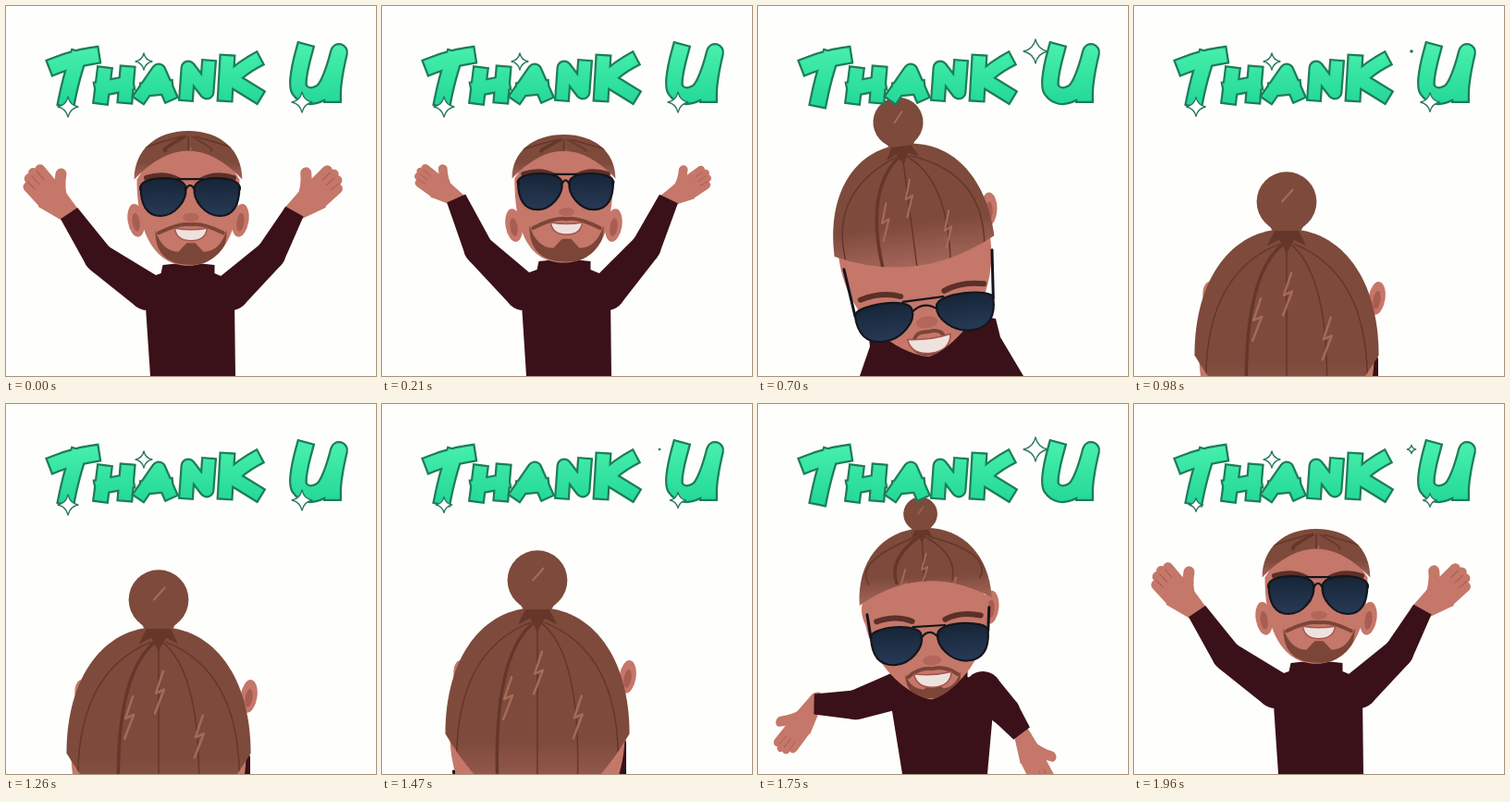
Write an HTML page with a canvas that moves like this. It is 400 by 400 pixels and loops after 2.03 s.

```html
<!DOCTYPE html>
<html lang="en">
<head>
<meta charset="utf-8">
<title>Thank U</title>
<style>
html, body { margin: 0; width: 100%; height: 100%; overflow: hidden; background: #fefefd; }
canvas { display: block; }
</style>
</head>
<body>
<canvas id="stage" width="400" height="400" role="img" aria-label="Thank U"></canvas>
<script>
const ctx = document.getElementById('stage').getContext('2d');
const LOOP = 2030, STEP = 70, TAU = Math.PI * 2;
const SKIN = '#c57769', SHADE = '#a95d52', HAIR = '#7d4a3b', DARK = '#653629',
      LIGHT = '#a56a58', CLOTH = '#3a1118', BEARD = '#7b4537', INK = '#14161c';

// x, y: point between the eyes; rise: height of the crown above it, which grows with the bow.
// neck, left, right, hipL, hipR: outline of the sweater.
const up = { x: 197, y: 206, rise: 71, tilt: 0, neck: 280, left: 148, right: 247, hipL: 156, hipR: 248 };
const back = { ...up, x: 196, y: 194, rise: 51, neck: 272 };
const nod = { ...up, x: 184, y: 259, rise: 125, tilt: -.06, neck: 286, left: 142, right: 255 };
const bow = { x: 179, y: 336, rise: 188, tilt: -.13, neck: 322, left: 118, right: 262, hipL: 110, hipR: 287 };
const low = { x: 165, y: 480, rise: 239, tilt: 0, neck: 346, left: 98, right: 264, hipL: 95, hipR: 264 };
const lift = { ...low, x: 168, y: 459, neck: 330 };
const figure = [[0, up], [420, back], [600, nod], [700, bow], [980, low], [1260, low],
  [1470, lift], [1645, bow], [1750, nod], [1960, up], [LOOP, up]];

// Each arm: angles of upper arm, forearm and hand in degrees, then reach.
const raised = { size: 1, breadth: 1, l: [215, 236, 222, 1], r: [-43, -61, -37, .92] };
const cupped = { size: .65, breadth: .55, l: [232, 256, 200, 1.08], r: [-54, -69, -20, 1.08] };
const spread = { size: .95, breadth: .9, l: [178, 188, 162, .7], r: [4, -4, 15, .63] };
const droop = { size: 1, breadth: .8, l: [161, 181, 122, .78], r: [44, 53, 68, .52] };
const hidden = { ...spread, l: [178, 188, 162, 0], r: [4, -4, 15, 0] };
const arms = [[0, raised], [420, cupped], [525, raised], [630, spread], [700, hidden], [1680, hidden],
  [1750, droop], [1820, spread], [1960, raised], [LOOP, raised]];

// Sparkles: x, y, largest radius, moment of the peak, share of time alight.
const sparkles = [[67, 109, 11, 200, .8], [320, 104, 11, 200, .8], [149, 60, 9, 90, .8], [300, 49, 13, 720, .15]];

const letters = [
  ['M55 64Q73 57 92 54M77 58Q70 80 66 100', 20],
  ['M106 74L103 98M131 73L129 97M104 89L130 84', 18],
  ['M147 96L165 70L176 95M153 90L173 88', 17],
  ['M195 95L197 67L217 93L219 66', 17],
  ['M239 61L237 95M268 60Q255 67 243 79L269 95', 18],
  ['M322 50Q313 83 317 90Q325 102 340 94Q350 89 360 50Q353 80 353 95', 20]
].map(([d, width]) => [new Path2D(d), width]);

const clamp = (v, a, b) => Math.max(a, Math.min(b, v));

function mix(a, b, k) {
  if (typeof a === 'number') return a + (b - a) * k;
  if (Array.isArray(a)) return a.map((v, i) => mix(v, b[i], k));
  return Object.fromEntries(Object.keys(a).map(n => [n, mix(a[n], b[n], k)]));
}
function at(track, t) {
  const i = track.findIndex(([end]) => end > t);
  const [[t0, a], [t1, b]] = [track[i - 1], track[i]];
  return mix(a, b, (t - t0) / (t1 - t0));
}

function fill(path, color) {
  ctx.fillStyle = color;
  ctx.fill(typeof path === 'string' ? new Path2D(path) : path);
}
function stroke(path, color, width, cap = 'round') {
  ctx.strokeStyle = color;
  ctx.lineWidth = width;
  ctx.lineCap = cap;
  ctx.lineJoin = 'round';
  ctx.stroke(typeof path === 'string' ? new Path2D(path) : path);
}
function oval(x, y, rx, ry, color, turn = 0) {
  ctx.beginPath();
  ctx.ellipse(x, y, rx, ry, turn, 0, TAU);
  ctx.fillStyle = color;
  ctx.fill();
}
function taper(x1, y1, r1, x2, y2, r2, color) {
  const a = Math.atan2(y2 - y1, x2 - x1) + Math.PI / 2, c = Math.cos(a), s = Math.sin(a);
  oval(x1, y1, r1, r1, color);
  fill(`M${x1 + c * r1} ${y1 + s * r1}L${x2 + c * r2} ${y2 + s * r2}L${x2 - c * r2} ${y2 - s * r2}L${x1 - c * r1} ${y1 - s * r1}Z`, color);
}
function blend(y0, y1, from, to, hold = 0) {
  const g = ctx.createLinearGradient(0, y0, 0, y1);
  g.addColorStop(hold, from);
  g.addColorStop(1, to);
  return g;
}

function drawArm(x, y, [upper, fore, hand, reach], size, breadth, side) {
  if (reach < .05) return;
  const rad = Math.PI / 180, u = 64 * reach, f = 58 * reach;
  const ex = x + u * Math.cos(upper * rad), ey = y + u * Math.sin(upper * rad);
  const wx = ex + f * Math.cos(fore * rad), wy = ey + f * Math.sin(fore * rad);
  ctx.save();
  ctx.translate(wx, wy);
  ctx.rotate(hand * rad);
  ctx.scale(size, breadth * side);
  taper(-4, 0, 10, 30, 0, 17, SKIN);
  for (let i = -1.5; i < 2; i++) stroke(`M28 ${i * 7}L${58 - i * i * 2 + i} ${i * 7.5 + 3}`, SKIN, 11);
  for (let i = -1; i < 2; i++) stroke(`M45 ${i * 7 + 2}L${57 - i * i} ${i * 7.5 + 3}`, SHADE, 1);
  stroke('M14 5Q28 14 35 26', SKIN, 12);
  ctx.restore();
  taper(x, y, 20, ex, ey, 16, CLOTH);
  taper(ex, ey, 16, wx, wy, 11, CLOTH);
}

function drawBody({ neck, left, right, hipL, hipR }) {
  const mid = (left + right) / 2, y = neck + 16;
  fill(`M${mid - 28} ${neck}Q${mid} ${neck - 4} ${mid + 28} ${neck}V${neck + 9}L${right - 5} ${y}L${right} ${y + 20}L${hipR} 400H${hipL}L${left + 3} ${y + 30}L${left} ${y}L${mid - 30} ${neck + 9}Z`, CLOTH);
}

function drawBun(r, top) {
  const y = top - r + 3;
  oval(0, y, r, r, HAIR);
  taper(0, y + r * .2, r * .85, 0, top + 6, r * .42, HAIR);
  stroke(`M${r * .2} ${y - r * .4}L${-r * .15} ${y}`, LIGHT, r * .07);
}

function drawHair(w, top, base, line, bun) {
  const h = base - top;
  const dome = new Path2D(`M${-w} ${base}C${-w} ${base - h * .6} ${-w * .6} ${top} 0 ${top}C${w * .6} ${top} ${w} ${base - h * .6} ${w} ${base}Q0 ${2 * line - base} ${-w} ${base}Z`);
  fill(dome, blend(top, Math.max(base, line), HAIR, '#a5655a', .65));
  ctx.save();
  ctx.clip(dome);
  for (let i = -2; i <= 2; i++) {
    const x = i * w * .42;
    stroke(`M${i * 4} ${top + h * .12}Q${x * 1.25} ${top + h * .4} ${x} ${line}`, DARK, i === -1 ? 3.5 : 1.5);
  }
  const s = w / 100;
  for (const [x, y] of [[-28, .55], [5, .35], [48, .7]]) {
    const px = x * s, py = top + h * y;
    stroke(`M${px} ${py}l${-8 * s} ${24 * s}l${9 * s} ${-4 * s}l${-10 * s} ${26 * s}`, LIGHT, 2.5 * s);
  }
  ctx.restore();
  const k = bun * .25;
  if (bun) fill(`M${-1.6 * k} ${top + 2}h${3.2 * k}l${k} ${2 * k}l${-1.6 * k} ${-.8 * k}l${-k} ${1.8 * k}l${-k} ${-1.8 * k}l${-1.6 * k} ${.8 * k}Z`, DARK);
}

function drawMouth(y, w, chin, rise) {
  const rx = 50 - .16 * rise, ry = 32 - .12 * rise, cy = chin - 1 - ry;
  const h = w * .45, edge = cy - ry * .6, dip = cy + ry * .4;
  fill(`M${-rx} ${edge}C${-rx} ${cy + ry * .6} ${-rx * .6} ${cy + ry} 0 ${cy + ry}C${rx * .6} ${cy + ry} ${rx} ${cy + ry * .6} ${rx} ${edge}Q${rx * .8} ${dip} ${rx * .35} ${dip}L${rx * .12} ${cy}H${-rx * .12}L${-rx * .35} ${dip}Q${-rx * .8} ${dip} ${-rx} ${edge}Z`, BEARD);
  stroke(`M${-rx * .9} ${edge + 3}Q${-w * .7} ${y - h * 1.5} 0 ${y - h * 1.2}Q${w * .7} ${y - h * 1.5} ${rx * .9} ${edge + 3}`, BEARD, 4);
  oval(0, y - h * 2.2, w * .5, h * .6, '#b3665a');
  const smile = new Path2D(`M${-w} ${y - h * .7}Q0 ${y - h * .3} ${w} ${y - h * .7}Q${w * .9} ${y + h} 0 ${y + h}Q${-w * .9} ${y + h} ${-w} ${y - h * .7}Z`);
  fill(smile, '#eee2df');
  stroke(smile, '#a5544e', 1.5);
}

function drawGlasses(span, w, h, gap, templeX, templeY) {
  for (const side of [1, -1]) {
    ctx.save();
    ctx.scale(side, 1);
    stroke(`M${span - w * .6} ${-gap + 3}Q${span} ${-gap - 5} ${span + w * .75} ${-gap + 1}`, '#5b3028', 6);
    ctx.translate(span, 0);
    const lens = new Path2D(`M${w} ${-h * .5}C${w} ${-h * 1.05} ${-w * .9} ${-h * 1.15} ${-w * .92} ${-h * .45}C${-w} ${h * .2} ${-w * .45} ${h} ${w * .15} ${h}C${w * .75} ${h} ${w} ${h * .4} ${w} ${-h * .5}Z`);
    fill(lens, blend(-h, h, '#162436', '#273a56'));
    stroke(lens, INK, 2.2);
    stroke(`M${w} ${-h * .5}L${templeX - span} ${templeY}`, INK, 3);
    ctx.restore();
  }
  const inner = span - w * .9;
  stroke(`M${-inner - 8} ${-h * .9}H${inner + 8}M${-inner} ${-h * .3}Q0 ${-h * .85} ${inner} ${-h * .3}`, INK, 2.2);
}

// All proportions of the head follow from how far it is bowed.
function drawHead({ x, y, tilt, rise }) {
  const w = 41 + .245 * rise, f = w * .95, chin = 94 - .27 * rise;
  const base = 17 - .5 * rise, line = .0045 * (rise - 135) ** 2 - 68;
  const bun = 2.5 * Math.sqrt(Math.max(0, rise - 71));
  const jaw = f * Math.max(.15, .7 - (rise - 51) * .0075), cheek = mix(base, chin, .72);
  const ear = 106 - 1.13 * rise;
  ctx.save();
  ctx.translate(x, y);
  ctx.rotate(tilt);
  for (const [ex, turn] of [[bun / 2 - w + 2, -.15], [w - 2, .15]]) {
    oval(ex, ear, 9, 18, SKIN, turn);
    oval(ex, ear + 2, 4, 10, SHADE, turn);
  }
  drawBun(bun, -rise);
  const face = new Path2D(`M${-f} ${base}C${-f} ${cheek} ${-jaw} ${chin} 0 ${chin}C${jaw} ${chin} ${f} ${cheek} ${f} ${base}Q0 ${2 * line - base - 30} ${-f} ${base}Z`);
  fill(face, SKIN);
  ctx.save();
  ctx.clip(face);
  ctx.translate(3, 0);
  drawMouth(40 - .001 * (rise - 85) ** 2, 14 + .05 * rise, chin, rise);
  ctx.restore();
  drawHair(w, -rise, base, line, bun);
  ctx.translate(2, 0);
  drawGlasses(19 + .128 * rise, 21 + .06 * rise, Math.min(21, rise * .33), Math.min(28, 7 + .2 * rise),
    f - 2, clamp(ear, -62, -8));
  ctx.restore();
}

function drawTitle(t) {
  const green = blend(42, 106, '#48f0ac', '#24d897');
  for (const [path, width] of letters) {
    stroke(path, '#1d7d59', width, 'square');
    stroke(path, green, width - 4.5, 'square');
  }
  for (const [x, y, peak, moment, lit] of sparkles) {
    const r = peak * clamp(lit + 1.2 * Math.cos((t - moment) / (LOOP / 2) * TAU), 0, 1), q = r * .18;
    if (r < .5) continue;
    const star = new Path2D(`M${x} ${y - r}Q${x + q} ${y - q} ${x + r} ${y}Q${x + q} ${y + q} ${x} ${y + r}Q${x - q} ${y + q} ${x - r} ${y}Q${x - q} ${y - q} ${x} ${y - r}Z`);
    fill(star, '#fff');
    stroke(star, '#2b7660', 1.3);
  }
}

function draw(now) {
  const t = Math.floor(now % LOOP / STEP) * STEP;
  ctx.fillStyle = '#fefefd';
  ctx.fillRect(0, 0, 400, 400);
  const pose = at(figure, t), { l, r, size, breadth } = at(arms, t);
  drawArm(153, 309, l, size, breadth, 1);
  drawArm(243, 309, r, size, breadth, -1);
  drawBody(pose);
  drawHead(pose);
  drawTitle(t);
}

const start = performance.now();
(function tick() {
  draw(performance.now() - start);
  requestAnimationFrame(tick);
})();
</script>
</body>
</html>
```
